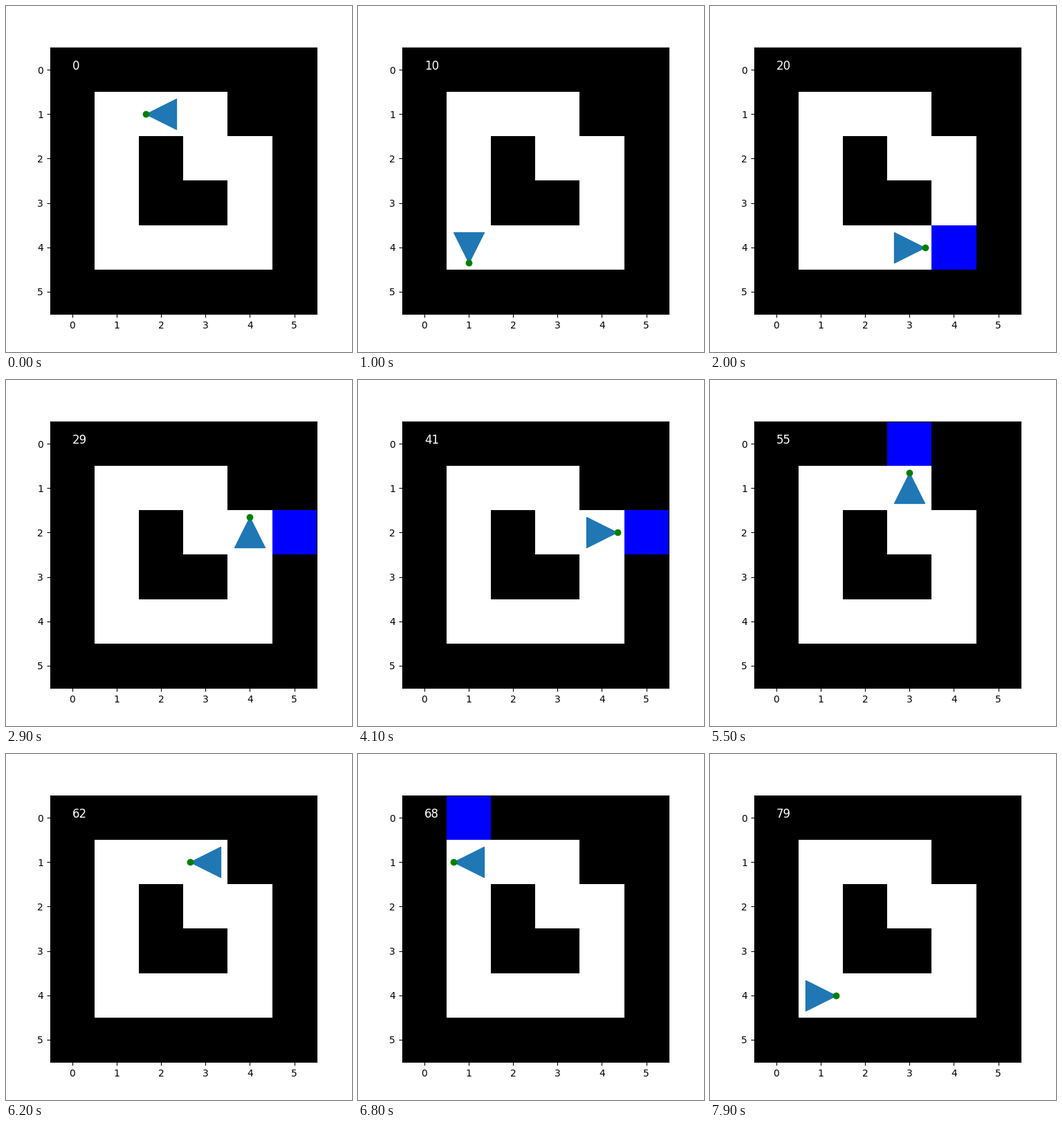
These frames come from a looping animation (500x500 px, 8 s). A matplotlib script:

```python
import matplotlib.pyplot as plt
import numpy as np
from matplotlib.animation import FuncAnimation
from matplotlib.markers import MarkerStyle

MAZE = ["######",
        "#...##",
        "#.#..#",
        "#.##.#",
        "#....#",
        "######"]
BLUE = (0, 0, 255)

# m: step forward, l / r: turn, F / L / R: feel the cell in front, left, right
ACTIONS = ("mRFlFmFmFm" "FLlRLFmFmF" "mFLlFmFmRF" "rFRLlRFrRL"
           "FRLFlRlFmF" "LrFmFRrFLl" "LlRFmFmRFl" "FmFmFmFLl")

# Headings in clockwise order: north, east, south, west
STEPS = [(0, -1), (1, 0), (0, 1), (-1, 0)]
MARKERS = [MarkerStyle(m) for m in "^>v<"]
PATHS = [m.get_path().transformed(m.get_transform()) for m in MARKERS]

grid = np.array([[[255 * (c == ".")] * 3 for c in row] for row in MAZE],
                dtype=np.uint8)


def ahead(x, y, heading):
    dx, dy = STEPS[heading % 4]
    return x + dx, y + dy


def walk(x, y, heading):
    """List of (x, y, heading, felt cell or None), one per tick."""
    states = [(x, y, heading, None)]
    for act in ACTIONS:
        felt = None
        if act == "m":
            x, y = ahead(x, y, heading)
        elif act in "lr":
            heading = (heading + (1 if act == "r" else -1)) % 4
        else:
            felt = ahead(x, y, heading + "LFR".index(act) - 1)
        states.append((x, y, heading, felt))
    return states


states = walk(2, 1, 3)

fig, ax = plt.subplots(figsize=(5, 5), dpi=100)
image = ax.imshow(grid)
body = ax.scatter(2, 1, s=1000, color="C0", zorder=2)
nose = ax.scatter(2, 1, s=36, color="green", zorder=3)
counter = ax.text(0, 0, "0", color="white", fontsize=12)
ax.set(xlim=(-0.5, 5.5), ylim=(5.5, -0.5), xticks=range(6), yticks=range(6))


def draw(tick):
    x, y, heading, felt = states[tick]
    cells = grid.copy()
    if felt:
        cells[felt[1], felt[0]] = BLUE
    image.set_data(cells)
    dx, dy = STEPS[heading]
    body.set_paths([PATHS[heading]])
    body.set_offsets([(x, y)])
    nose.set_offsets([(x + 0.35 * dx, y + 0.35 * dy)])
    counter.set_text(str(tick))
    return image, body, nose, counter


anim = FuncAnimation(fig, draw, frames=len(states), interval=100,
                     repeat=True, repeat_delay=0)
plt.show()
```
